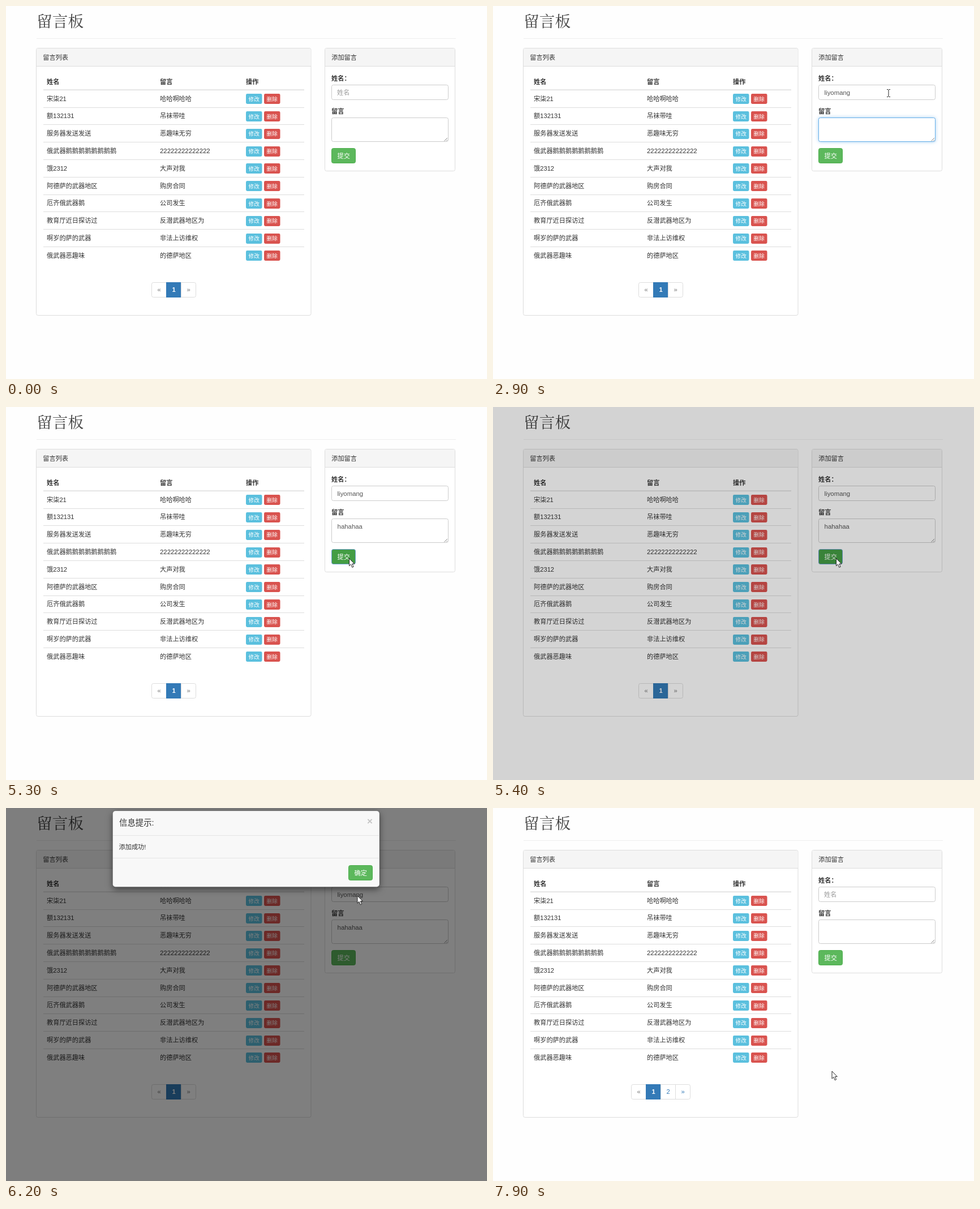
Animation of 850x659 px, one loop 8 s. Source, as an HTML page:

```html
<!DOCTYPE html>
<html lang="zh-CN">
<head>
<meta charset="utf-8">
<title>留言板</title>
<style>
html, body { margin: 0; width: 100%; height: 100%; overflow: hidden; background: #fefefe; }
svg { display: block; width: 850px; height: 659px; }
text { font: 11.2px "Liberation Sans", "Noto Sans CJK SC", "Noto Sans CJK", sans-serif; fill: #333; white-space: pre; }
.bold { font-weight: bold; }
.title { font: 300 27.7px "Noto Serif CJK SC", "Noto Sans CJK SC", "Noto Sans CJK", sans-serif; fill: #444; }
.head { font-size: 14.4px; font-weight: 300; }
.close { font-size: 17px; font-weight: bold; fill: #c4c4c4; }
.small { font-size: 9.6px; }
.white { fill: #fff; }
.latin { font-size: 11.4px; }
.field { fill: #555; }
.hint { fill: #999; }
.mid { text-anchor: middle; }
.off { fill: #777; }
.link { fill: #337ab7; }
.status { font: 9.5px "Noto Sans", "Noto Sans CJK SC", "Noto Sans CJK", sans-serif; fill: #555; }
.glow { filter: drop-shadow(0 0 3px rgba(102, 175, 233, .6)); }
.box { filter: drop-shadow(0 4px 6px rgba(0, 0, 0, .5)); }
</style>
</head>
<body>
<svg id="stage" viewBox="0 0 850 659"></svg>
<script>
const rect = (x, y, w, h, fill, stroke = 'none', r = 3, more = '') =>
  `<rect x="${x}" y="${y}" width="${w}" height="${h}" rx="${r}" fill="${fill}" stroke="${stroke}" ${more}/>`;
const text = (x, y, s, cls = '', id = '') => `<text x="${x}" y="${y}" class="${cls}" id="${id}">${s}</text>`;
const path = (d, stroke = '#ddd', more = '') => `<path d="${d}" stroke="${stroke}" fill="none" ${more}/>`;
const group = (id, body) => `<g id="${id}">${body}</g>`;

const rows = [
  ['宋柒21', '哈哈啊哈哈'], ['额132131', '吊袜带哇'], ['服务器发送发送', '恶趣味无穷'],
  ['俄武器' + '鹅'.repeat(8), '2'.repeat(14)], ['饿2312', '大声对我'],
  ['阿德萨的武器地区', '购房合同'], ['厄齐俄武器鹅', '公司发生'],
  ['教育厅近日探访过', '反潜武器地区为'], ['啊岁的萨的武器', '非法上访维权'], ['俄武器恶趣味', '的德萨地区']
];

const panel = (x, w, h, title) =>
  rect(x, 74.5, w, h, '#fff', '#ddd') +
  rect(x + .5, 75, w - 1, 32, '#f5f5f5', 'none', 2) +
  path(`M${x} 106.5H${x + w}`) + text(x + 11.7, 95, title);

const smallButton = (x, y, s, fill) =>
  rect(x, Math.round(y - 12.5), 28.5, 18, fill, 'none', 2.4) + text(x + 4.6, y + .2, s, 'small white');

function row([name, message], i) {
  const y = 167.6 + 30.8 * i, line = Math.round(y + 12) - .5;
  return text(72, y, name) + text(272, y, message, /^\d+$/.test(message) ? 'latin' : '') +
    smallButton(424, y, '修改', '#5bc0de') + smallButton(456, y, '删除', '#d9534f') +
    (i < 9 ? path(`M66 ${line}H527`) : '');
}

function pager(id, x, marks) {
  const w = 26, cell = (s, i) =>
    (i ? path(`M${x + w * i + .5} 488V515`) : '') +
    (s == '1' ? rect(x + w * i, 488, w + 1, 27, '#337ab7', 'none', 0) : '') +
    text(x + w * (i + .5) + .5, 505, s, 'mid ' + (s == '1' ? 'white bold' : s == '«' || marks.length == 3 ? 'off' : 'link'));
  return group(id, rect(x + .5, 488.5, w * marks.length, 26, '#fff', '#ddd') + marks.map(cell).join(''));
}

const input = (id, y, h) => rect(575.5, y, 206, h, '#fff', '#ccc') +
  rect(575.5, y, 206, h, '#fff', '#66afe9', 3, `class="glow" id="${id}"`);
const greenButton = (id, x, y, s) =>
  rect(x, y, 42, 26, '#5cb85c', '#4cae4c', 3, `id="${id}"`) + text(x + 10, y + 17.5, s, 'white');

stage.innerHTML =
  rect(0, 0, 850, 659, '#fefefe', 'none', 0) +
  text(54, 37.2, '留言板', 'title') + path('M54 57.5H795', '#eee') +
  panel(53.5, 485.5, 472, '留言列表') +
  text(72, 137.5, '姓名', 'bold') + text(272, 137.5, '留言', 'bold') + text(424, 137.5, '操作', 'bold') +
  path('M66 148.3H527', '#ddd', 'stroke-width="1.6"') +
  rows.map(row).join('') +
  pager('onePage', 257, ['«', '1', '»']) + pager('twoPages', 244, ['«', '1', '2', '»']) +
  panel(563.5, 230, 217, '添加留言') +
  text(575, 131.5, '姓名：', 'bold') + text(575, 189.5, '留言', 'bold') +
  input('nameGlow', 139.5, 26) + input('noteGlow', 197.5, 42) +
  path('M774.5 238.5L780 233M778 238.5L780 236.5', '#888') +
  text(585, 157, '姓名', 'hint', 'hint') +
  text(585.6, 156.7, '', 'latin field', 'nameText') + text(585.6, 215, '', 'latin field', 'noteText') +
  rect(0, 0, 1, 13, '#222', 'none', 0, 'id="caret"') +
  greenButton('submit', 575.5, 251.5, '提交') +
  rect(0, 0, 850, 659, '#000', 'none', 0, 'id="shade"') +
  group('modal',
    rect(188.5, 5, 471.5, 134.5, '#f8f8f8', 'rgba(0,0,0,.2)', 5, 'class="box"') +
    text(200, 31.3, '信息提示:', 'head') + text(643, 29, '×', 'close mid') +
    path('M189 48.5H660M189 88.5H660', '#e5e5e5') +
    text(199.5, 73.3, '添加成功!') + greenButton('confirm', 605.5, 101.5, '确定')) +
  group('status', '<path d="M0 645.5H277Q280 645.5 280 648.5V659H0Z" fill="#f5f5f5"/>' +
    text(-1, 657.5, '正在等待 apps.bdimg.com 的响应...', 'status')) +
  group('beam', path('M-3 -6.5H-1L0 -5.5L1 -6.5H3M-3 6.5H-1L0 5.5L1 6.5H3M0 -5.5V5.5', '#222')) +
  group('arrow', '<path d="M0 0V13.2L3 10.4L5.2 15.8L7.6 14.8L5.4 9.6H9.3Z" fill="#fff" stroke="#111" stroke-width=".9"/>');

const el = Object.fromEntries([...stage.querySelectorAll('[id]')].filter(e => e.id).map(e => [e.id, e]));
const set = (e, a, v) => e.setAttribute(a, v);
const show = (e, v) => set(e, 'opacity', +v);
const clamp = v => Math.max(0, Math.min(1, v));
const fade = (t, from, to) => clamp((t - from) / 150) - clamp((t - to) / 150);

// time, x, y of the pointer
const track = [
  [200, 712, 114], [600, 699, 154], [4300, 699, 154], [4400, 698, 156], [4700, 668, 196], [5000, 613, 262],
  [5200, 606.5, 267.5], [5900, 606.5, 267.5], [6200, 621, 155], [6400, 637, 114], [6700, 637, 114],
  [6900, 642, 115], [7300, 642, 115], [7400, 654, 128], [7500, 676, 262], [7600, 652, 442],
  [7700, 628, 436], [7900, 599, 465]
];
function pointer(t) {
  const i = track.findIndex(k => k[0] > t);
  if (i < 0) return track.at(-1).slice(1);
  if (!i) return track[0].slice(1);
  const [a, b] = [track[i - 1], track[i]], p = (t - a[0]) / (b[0] - a[0]);
  return [a[1] + (b[1] - a[1]) * p, a[2] + (b[2] - a[2]) * p];
}

function paintButton(e, hover, focus) {
  set(e, 'fill', hover ? '#449d44' : '#5cb85c');
  set(e, 'stroke', focus ? '#6c9fd0' : hover ? '#398439' : '#4cae4c');
}

function draw(t) {
  const loaded = t >= 7400;
  const typed = loaded || t < 1400 ? 0 : t < 2100 ? Math.min(6, Math.floor(t / 100) - 13) : 8;
  const noted = loaded || t < 3100 ? 0 : t >= 4500 ? 7 : [1, 2, 3, 5, 6][Math.min(4, Math.floor(t / 100) - 31)];
  el.nameText.textContent = 'liyomang'.slice(0, typed);
  el.noteText.textContent = 'hahahaa'.slice(0, noted);
  show(el.hint, !typed);
  show(el.nameGlow, fade(t, 500, 2350));
  show(el.noteGlow, fade(t, 2350, 5100));

  const inNote = t >= 2400;
  const lit = [[600, 1200], [1400, 2900], [3100, 4000], [4500, 5000]].some(([a, b]) => t >= a && t < b);
  const box = inNote ? el.noteText : el.nameText;
  set(el.caret, 'x', 586 + Math.floor(box.textContent ? box.getComputedTextLength() : 0));
  set(el.caret, 'y', inNote ? 204 : 146);
  show(el.caret, lit);

  show(el.onePage, !loaded);
  show(el.twoPages, loaded);
  paintButton(el.submit, t >= 5000 && t < 5500, t >= 5200 && t < 5500);
  paintButton(el.confirm, t >= 6400 && t < 7000, t >= 6600);

  show(el.shade, loaded ? 0 : .5 * clamp((t - 5350) / 150));
  const slide = t < 6700 ? (1 - clamp((t - 5500) / 300)) ** 2 : 1 - (1 - clamp((t - 6750) / 300)) ** 2;
  show(el.modal, fade(t, 5500, 6750));
  set(el.modal, 'transform', `translate(0 ${-33 * slide})`);
  show(el.status, .8 * fade(t, 7050, 7700));

  const [x, y] = pointer(t);
  const overField = t < 5300 && x > 575 && x < 782 && (y > 139 && y < 166 || y > 197 && y < 240);
  for (const e of [el.beam, el.arrow]) set(e, 'transform', `translate(${x} ${y})`);
  show(el.beam, t >= 200 && overField);
  show(el.arrow, t >= 200 && !overField);
}

function tick(now) {
  draw(Math.floor(now % 8000 / 100) * 100);
  requestAnimationFrame(tick);
}
draw(0);
requestAnimationFrame(tick);
</script>
</body>
</html>
```
